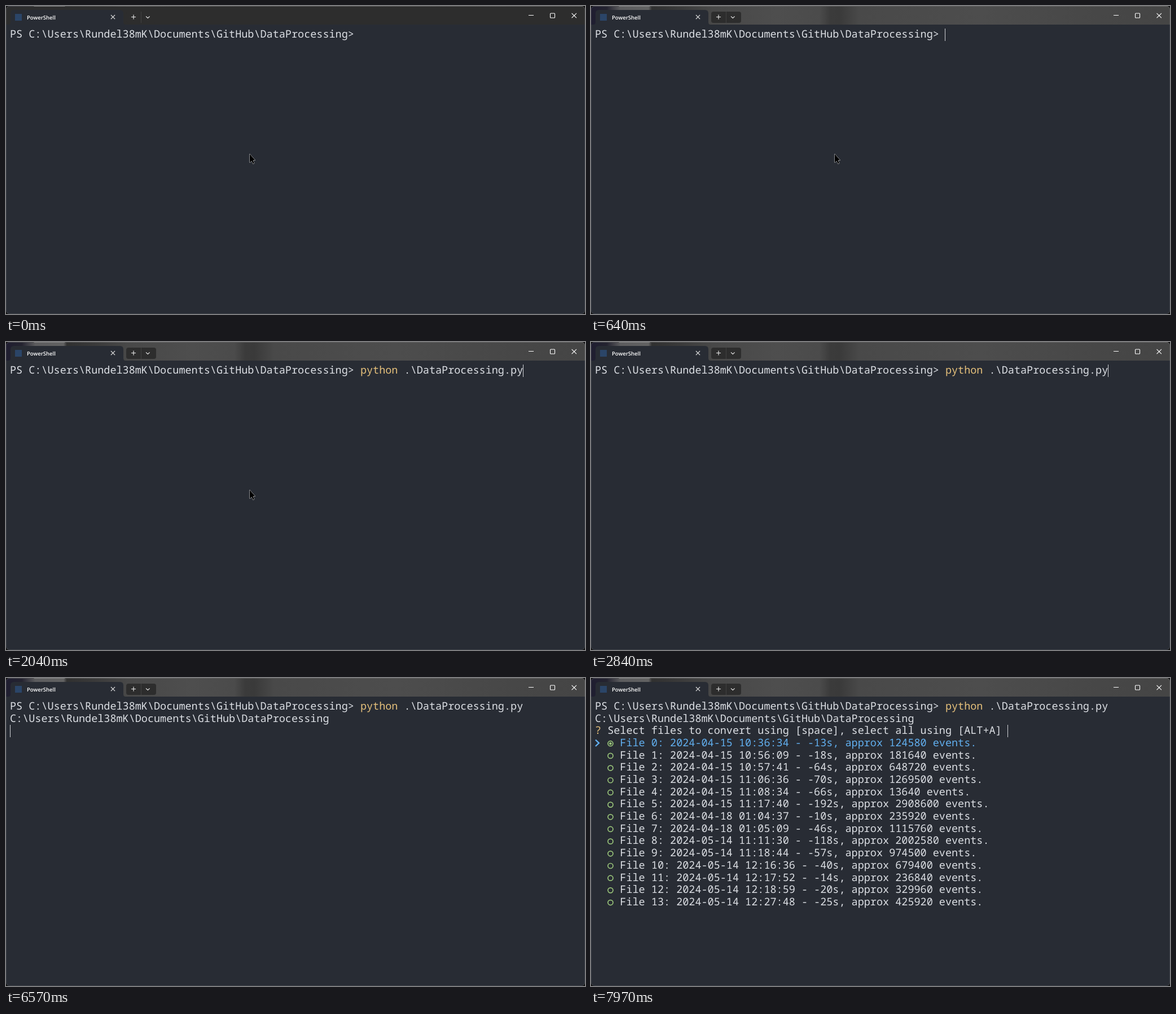
These frames come from a looping animation (1026x546 px, 8 s). An HTML page with a canvas:

```html
<!DOCTYPE html>
<html lang="en">
<head>
<meta charset="utf-8">
<title>Terminal session</title>
<style>
  html, body { margin: 0; width: 100%; height: 100%; overflow: hidden; background: #111; }
  canvas { display: block; width: 1026px; height: 546px; }
</style>
</head>
<body>
<canvas id="stage" width="1026" height="546"></canvas>
<script>
const ctx = document.getElementById('stage').getContext('2d');
const W = 1026, H = 546, LOOP = 8000;
const COL = 11.088, ROW = 21.68, LEFT = 7, TOP = 40;
const BG = '#282c34', FG = '#dcdfe4', YELLOW = '#e5c07b', GREEN = '#98c379', BLUE = '#61afef';

const folder = 'C:\\Users\\Rundel38mK\\Documents\\GitHub\\DataProcessing';
const prompt = `PS ${folder}> `;
const question = 'Select files to convert using [space], select all using [ALT+A] ';
const files = `2024-04-15 10:36:34 13 124580
2024-04-15 10:56:09 18 181640
2024-04-15 10:57:41 64 648720
2024-04-15 11:06:36 70 1269500
2024-04-15 11:08:34 66 13640
2024-04-15 11:17:40 192 2908600
2024-04-18 01:04:37 10 235920
2024-04-18 01:05:09 46 1115760
2024-05-14 11:11:30 118 2002580
2024-05-14 11:18:44 57 974500
2024-05-14 12:16:36 40 679400
2024-05-14 12:17:52 14 236840
2024-05-14 12:18:59 20 329960
2024-05-14 12:27:48 25 425920`.split('\n').map((line, i) => {
  const [day, time, seconds, events] = line.split(' ');
  return `File ${i}: ${day} ${time} - -${seconds}s, approx ${events} events.`;
});

function box(x, y, w, h, radius, color) {
  ctx.beginPath();
  ctx.roundRect(x, y, w, h, radius);
  ctx.fillStyle = color;
  ctx.fill();
}

function line(points, color, width = 1.1, close = false) {
  ctx.beginPath();
  points.forEach(([x, y]) => ctx.lineTo(x, y));
  if (close) ctx.closePath();
  ctx.strokeStyle = color;
  ctx.lineWidth = width;
  ctx.stroke();
}

function gradient(stops) {
  const fill = ctx.createLinearGradient(0, 0, W, 0);
  for (const [x, color] of stops) fill.addColorStop(x / W, color);
  return fill;
}

const backdrop = gradient([[0, '#1f1d30'], [28, '#242330'], [52, '#5c5c5e'], [102, '#626262'],
  [108, '#303030'], [150, '#383838'], [215, '#484848'], [330, '#4e4e4e'], [405, '#4b4b4b'],
  [424, '#3b3b3b'], [440, '#3a3a3a'], [475, '#494949'], [690, '#4d4d4d'], [900, '#474747'], [W, '#454545']]);
const topEdge = gradient([[0, '#30303a'], [49, '#3c3c3e'], [50, '#777777'], [104, '#777777'],
  [105, '#3c3c3c'], [220, '#575757'], [420, '#474747'], [W, '#565656']]);

// Text sits on the terminal's character grid.
function put(text, col, row, color = FG) {
  ctx.font = '18.48px "Noto Sans Mono", monospace';
  ctx.fillStyle = color;
  [...text].forEach((char, i) => ctx.fillText(char, LEFT + (col + i) * COL, TOP + 16 + row * ROW));
}

function caret(col, row) {
  ctx.fillStyle = '#d0d2d6';
  ctx.fillRect(Math.floor(LEFT + col * COL), Math.round(TOP + row * ROW), 1, 22);
}

function cross(x, y, size, color) {
  line([[x - size, y - size], [x + size, y + size]], color);
  line([[x - size, y + size], [x + size, y - size]], color);
}

function drawTitleBar(focus) {
  box(0, 0, W, 33, 0, '#2d2d2d');
  ctx.globalAlpha = focus;
  box(0, 0, W, 33, 0, backdrop);
  ctx.globalAlpha = 1;
  box(0, 0, W, 1, 0, topEdge);

  ctx.beginPath();
  ctx.moveTo(4, 33);
  ctx.quadraticCurveTo(8, 33, 8, 29);
  ctx.lineTo(8, 13);
  ctx.quadraticCurveTo(8, 7, 14, 7);
  ctx.lineTo(202, 7);
  ctx.quadraticCurveTo(208, 7, 208, 13);
  ctx.lineTo(208, 29);
  ctx.quadraticCurveTo(208, 33, 212, 33);
  ctx.fillStyle = BG;
  ctx.fill();

  box(16, 14, 12, 12, 0, '#2b4568');
  ctx.font = '600 9.5px "Open Sans", sans-serif';
  ctx.fillStyle = '#fff';
  ctx.fillText('PowerShell', 37, 24);
  cross(189.5, 19.5, 3.6, '#eee');

  box(213, 10, 53, 20, 4, '#2d2d2d');
  box(239, 10, 1, 20, 0, '#424242');
  line([[222, 19.5], [230, 19.5]], '#eee');
  line([[226, 15.5], [226, 23.5]], '#eee');
  line([[248, 18.3], [251.3, 21.4], [254.6, 18.3]], '#eee');

  line([[926, 16.5], [935, 16.5]], '#fff');
  ctx.beginPath();
  ctx.roundRect(964.5, 13, 8, 8, 1);
  ctx.stroke();
  cross(1006.7, 17, 4.2, '#fff');
}

function drawPointer() {
  const shape = [[432, 262.5], [432, 277.5], [435.3, 274.4], [437.7, 279.8],
    [439.9, 278.8], [437.5, 273.6], [441.4, 273.3]];
  line(shape, '#e8e8e8', 1, true);
  ctx.fillStyle = '#000';
  ctx.fill();
}

function drawMenu(selected) {
  put('?', 0, 2, YELLOW);
  put(question, 2, 2);
  line([[8, 109.5], [14, 115.3], [8, 121]], BLUE, 2.4);
  files.forEach((text, i) => {
    const y = 116.2 + i * ROW;
    ctx.beginPath();
    ctx.arc(34.5, y, 4.5, 0, Math.PI * 2);
    ctx.strokeStyle = GREEN;
    ctx.lineWidth = 1.7;
    ctx.stroke();
    if (selected && i === 0) {
      ctx.beginPath();
      ctx.arc(34.5, y, 2.3, 0, Math.PI * 2);
      ctx.fillStyle = GREEN;
      ctx.fill();
    }
    put(text, 4, i + 3, i === 0 ? BLUE : FG);
  });
}

function drawTerminal(t) {
  const command = t < 1170 ? '' : t < 2040 ? 'clear' : 'python';
  const argument = t < 2040 ? '' : ' .\\DataProcessing.py';
  const end = prompt.length + command.length + argument.length;

  put(prompt, 0, 0);
  put(command, prompt.length, 0, YELLOW);
  put(argument, prompt.length + command.length, 0);
  if (t >= 6570) put(folder, 0, 1);
  if (t >= 6640) drawMenu(t >= 7970);

  if (t >= 6640) caret(question.length + 2, 2);
  else if (t >= 6570) caret(0, 2);
  else if (t >= 2900) caret(0, 1);
  else if (t >= 500) caret(end, 0);
  if (t < 2840) drawPointer();
}

function draw(t) {
  const focus = t < 500 ? 0 : t < 570 ? 1 / 3 : t < 640 ? 2 / 3 : 1;
  ctx.clearRect(0, 0, W, H);
  ctx.save();
  ctx.beginPath();
  ctx.roundRect(0, 0, W, H, 6);
  ctx.clip();
  box(0, 0, W, H, 0, BG);
  drawTitleBar(focus);
  drawTerminal(t);
  ctx.restore();
  ctx.beginPath();
  ctx.roundRect(0.5, 0.5, W - 1, H - 1, 6);
  ctx.strokeStyle = 'rgba(255, 255, 255, 0.1)';
  ctx.lineWidth = 1;
  ctx.stroke();
}

ctx.textRendering = 'geometricPrecision';
const start = performance.now();
function tick() {
  draw((performance.now() - start) % LOOP);
  requestAnimationFrame(tick);
}
tick();
</script>
</body>
</html>
```
